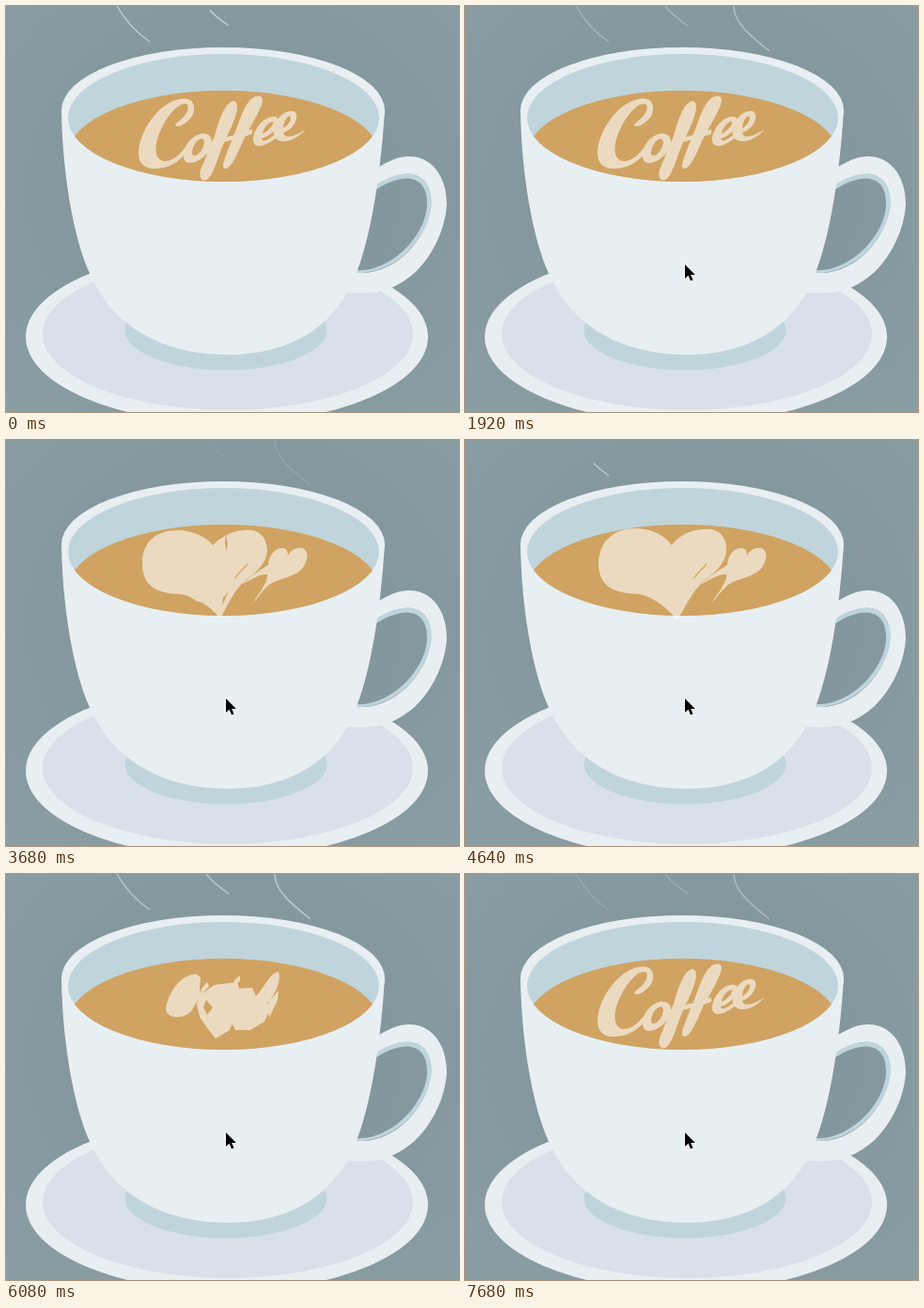
An HTML page for the animation above (8 s loop, 482x432 px).

```html
<!DOCTYPE html>
<html lang="en">
<head>
<meta charset="utf-8">
<title>Coffee cup</title>
<style>
  html, body { margin: 0; width: 100%; height: 100%; overflow: hidden; background: #84979d; }
  svg { display: block; width: 100%; height: 100%; }
  .light { fill: #e8eff2; }
  .shade { fill: #c0d5db; }
  .steam path { fill: none; stroke: #c6d5d9; stroke-width: 1.5; stroke-dasharray: 1 2; }
</style>
</head>
<body>
<svg viewBox="0 0 482 432" role="img" aria-label="Coffee">
  <defs>
    <radialGradient id="wall" cx=".52" cy=".45" r=".72">
      <stop offset="0" stop-color="#7e9299"/>
      <stop offset="1" stop-color="#8a9da2"/>
    </radialGradient>
    <clipPath id="bowl"><ellipse cx="231.5" cy="119" rx="165.5" ry="68"/></clipPath>
  </defs>
  <rect width="482" height="432" fill="url(#wall)"/>

  <g class="steam">
    <path pathLength="1" d="M153 38C138 28 126 14 118 0"/>
    <path pathLength="1" d="M237 21C227 14 219 8 213 0"/>
    <path pathLength="1" d="M324 48C305 33 286 18 286 0"/>
  </g>

  <ellipse class="light" cx="235" cy="352" rx="214" ry="92"/>
  <ellipse cx="236" cy="349" rx="197" ry="81" fill="#d8e1e9"/>
  <ellipse class="shade" cx="234" cy="345" rx="107.5" ry="42.5"/>

  <path class="light" d="M394 173C412 161 428 157 441 162C459 168 469 188 469 211C467 245 445 285 412 299C397 306 380 306 360 305L374 284C415 287 452 245 452 208C452 176 425 170 394 191Z"/>
  <path class="shade" d="M394 190C425 170 452 176 453 208C452 245 415 287 370 284L372 281C410 284 448 243 448 210C448 180 424 176 394 195Z"/>
  <path class="light" d="M59 110C60 190 76 262 92 290C112 335 160 371 235 371C305 371 345 340 366 300C386 260 398 190 403 110Z"/>
  <ellipse class="light" cx="231" cy="111" rx="172" ry="67"/>
  <ellipse class="shade" cx="231.5" cy="119" rx="165.5" ry="68"/>
  <ellipse cx="231.5" cy="158" rx="165.5" ry="68" fill="#d0a362" clip-path="url(#bowl)"/>

  <path id="foam" fill="#fff" fill-opacity=".6"/>
  <path id="cursor" d="M0 0V15L3.6 11.8L6 17.5L8.6 16.4L6.2 10.9H11Z" stroke="#fff" stroke-width="1.2" paint-order="stroke"/>
</svg>
<script>
const LOOP = 8000, STEP = 160, SAMPLES = 90;
const SVG_NS = 'http://www.w3.org/2000/svg';
const dot = (x, y) => `M${x} ${y}h-1v1h1Z`;

// Every pose has seven pieces: C, o, f, f, crossbar, e, e.
const word = [
  'M200 110C201 98 190 96 178 101C158 109 141 137 141 157C141 169 150 174 161 173C177 172 189 162 195 151L192 149C184 160 175 166 168 165C156 163 158 145 166 129C173 115 184 103 191 104C196 105 194 113 188 119C184 123 181 124 180 127C182 129 186 128 190 125C196 121 200 116 200 110Z',
  'M207 136C194 139 186 155 190 164C194 171 209 165 216 154C222 144 219 134 207 136L208 141C213 142 211 150 207 155C203 160 198 161 198 156C198 150 203 142 208 141Z',
  'M238 103C231 108 226 124 222 138L208 172C204 181 208 187 213 185C220 181 223 168 230 150C236 136 246 118 246 107C246 101 242 100 238 103Z',
  'M267 96C258 97 252 112 247 126L235 156C231 166 229 174 234 173C241 171 246 157 252 144C260 128 273 108 273 100C273 96 270 95 267 96Z',
  'M262 131C245 138 230 139 215 146L217 151C232 143 247 142 262 136Z',
  'M283 118C272 119 262 134 263 144C265 153 278 149 290 138L287 136C280 142 273 146 272 141C281 139 291 128 290 121C289 118 286 117 283 118L283 123C287 124 280 133 273 136C273 132 278 124 283 123Z',
  'M302 112C291 113 283 128 285 137C288 148 306 146 319 131C310 137 297 143 295 135C304 132 311 122 309 115C308 112 305 111 302 112L302 117C305 119 301 127 295 130C295 125 298 118 302 117Z'
];
const gathering = [
  'M212 110C200 107 184 120 182 134C183 144 192 143 194 153L205 168L218 174L228 167L250 166L262 148L240 140C230 158 217 160 210 155C206 145 210 130 214 122L216 112Z',
  'M258 112L232 112L220 127L223 142L220 153L235 150L262 140L275 125L271 113Z',
  'M219 111L215 117L216 122L220 115Z',
  'M297 107C288 107 279 122 272 128L250 158L246 170L258 166L262 171L276 144L290 132C299 122 301 110 297 107Z',
  'M268 143L269 145L259 158L261 152Z',
  'M230 107L225 112L224 119L230 113Z',
  'M248 109L240 114L244 118L254 112Z'
];
const smallHeart = 'M300 123C300 119 299 115 294 115C286 115 280 122 279 133C273 137 262 143 250 154C262 148 270 142 278 143C280 150 268 164 262 175C268 167 273 160 280 154C290 147 310 146 317 134C322 126 322 117 315 115C309 114 303 117 300 123Z';
const slit = 'M257 131L257 133L242 149L245 144Z';
const almostHeart = [
  'M220 112C213 103 200 97 184 96C160 96 145 108 145 131C145 158 164 163 184 164C198 165 202 173 206 172C214 175 222 183 228 190C237 174 242 160 256 148C268 140 277 130 278 118C278 108 273 98 262 96C247 95 233 99 220 112Z',
  'M234 100L236 112L234 118L233 108Z',
  'M237 161L230 176L231 168Z',
  dot(250, 115), slit, dot(300, 130), smallHeart
];
const heart = [
  'M220 112C213 102 200 95 183 94C160 94 143 106 142 131C142 160 165 163 185 164C205 168 218 183 226 191C237 174 242 160 256 148C268 140 277 130 278 118C279 108 274 97 262 95C247 94 230 98 220 112Z',
  dot(215, 140), dot(230, 140), dot(250, 115), slit, dot(300, 130), smallHeart
];
const scattering = [
  'M203 107C187 105 172 127 170 144C172 155 190 154 197 146L208 128L206 122L207 110Z',
  'M246 115L222 118L207 128L203 138L206 152L215 165L223 175L238 166L244 150L254 140Z',
  'M214 115L208 122L207 128L216 120Z',
  'M290 104C281 105 274 122 266 130L262 121L246 122L236 150L244 166L260 166L275 157L284 138L277 138C288 128 293 112 290 104Z',
  'M213 134L220 142L214 150L210 142Z',
  'M249 108L243 113L243 119L249 114Z',
  'M290 124L279 136L280 153L289 134Z'
];
const poses = [
  [0, word], [3120, word], [3360, gathering], [3680, almostHeart],
  [3840, heart], [5760, heart], [6080, scattering], [6320, word], [LOOP, word]
];

function sample(d) {
  const path = document.createElementNS(SVG_NS, 'path');
  path.setAttribute('d', d);
  const length = path.getTotalLength();
  return Array.from({ length: SAMPLES }, (_, i) => path.getPointAtLength(length * i / SAMPLES));
}
const outlines = new Map(poses.map(([, pose]) => [pose, pose.map(sample)]));

// Finds the keys around t and how far t lies between them.
function between(keys, t) {
  const i = Math.max(1, keys.findIndex(key => key[0] >= t));
  const [from, to] = [keys[i - 1], keys[i]];
  return [from[1], to[1], (t - from[0]) / (to[0] - from[0])];
}
const mix = (a, b, u) => a + (b - a) * u;
const track = (keys, t) => mix(...between([...keys, [LOOP, keys.at(-1)[1]]], t));

function foamPath(t) {
  const [from, to, u] = between(poses, t);
  if (from === to || u === 0) return from.join('');
  if (u === 1) return to.join('');
  const target = outlines.get(to);
  return outlines.get(from).map((points, p) => 'M' + points.map((a, i) => {
    const b = target[p][i];
    return mix(a.x, b.x, u).toFixed(1) + ' ' + mix(a.y, b.y, u).toFixed(1);
  }).join('L') + 'Z').join('');
}

const steam = [
  { alpha: [[0, .85], [1120, .65], [1920, .45], [3200, .2], [3360, .15], [3680, 0], [4399, 0], [4400, .85], [6400, .75], [7680, .22]],
    drawn: [[0, 1], [4399, 1], [4400, 0], [5000, 1]] },
  { alpha: [[0, .85], [1120, .7], [1920, .5], [3200, .25], [3360, .2], [3680, .1], [4000, 0], [4799, 0], [4800, .85], [6400, .78], [7680, .35]],
    drawn: [[0, .82], [160, 1], [4799, 1], [4800, 0], [5400, 1]] },
  { alpha: [[0, 0], [1, .85], [1120, .8], [1920, .7], [3200, .42], [3360, .38], [3680, .2], [4320, 0], [5199, 0], [5200, .85], [6400, .82], [7680, .58]],
    drawn: [[0, 0], [640, 1], [5199, 1], [5200, 0], [5840, 1]] }
];
const cursorX = [[0, 246], [640, 246], [1120, 249], [1280, 247], [1600, 238], [1920, 234]];
const cursorY = [[0, 440], [640, 440], [960, 412], [1120, 380], [1280, 348], [1440, 316], [1600, 293], [1760, 280], [1920, 275]];

const plumes = document.querySelectorAll('.steam path');
const foam = document.getElementById('foam');
const cursor = document.getElementById('cursor');

function hold(t) {
  if (t > 1920 && t < 3200) return 1920;
  if (t > 6400 && t < 7680) return 6400;
  return t;
}

function draw(t) {
  steam.forEach(({ alpha, drawn }, i) => {
    plumes[i].style.opacity = track(alpha, t);
    plumes[i].style.strokeDashoffset = 1 - track(drawn, t);
  });
  foam.setAttribute('d', foamPath(t));
  cursor.setAttribute('transform', `translate(${track(cursorX, t)} ${track(cursorY, t)})`);
}

const start = performance.now();
let shown = -1;
function tick() {
  const t = hold(Math.floor((performance.now() - start) % LOOP / STEP) * STEP);
  if (t !== shown) draw(shown = t);
  requestAnimationFrame(tick);
}
tick();
</script>
</body>
</html>
```
